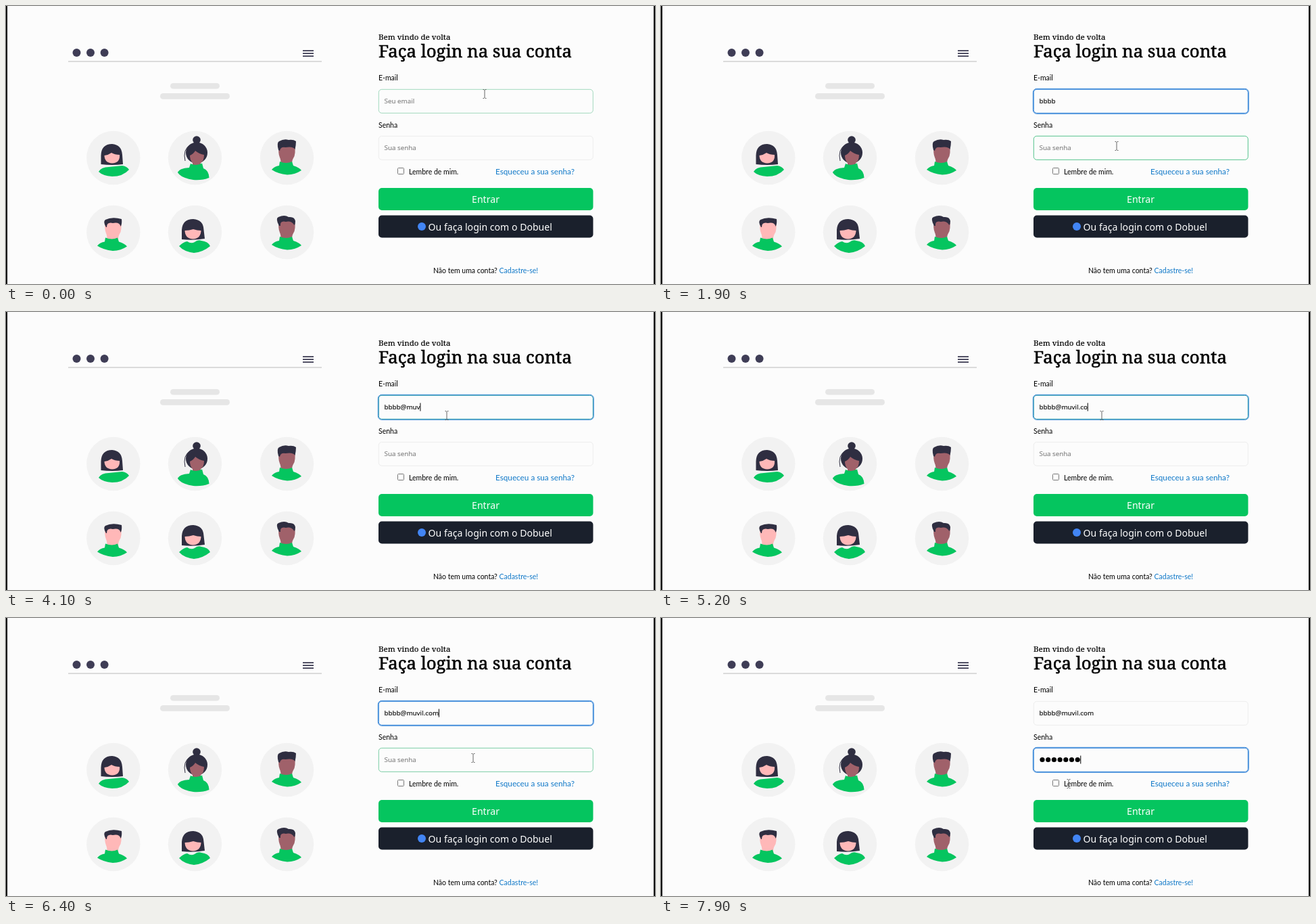
An HTML page that plays this animation: 960 by 411 pixels, repeating every 8000 ms.

```html
<!DOCTYPE html>
<html lang="pt">
<head>
<meta charset="utf-8">
<title>Login</title>
<style>
  html, body { margin: 0; width: 100%; height: 100%; overflow: hidden; background: #fcfcfc; }
  svg { display: block; width: 960px; height: 411px; }
  .serif { font-family: "Noto Serif", serif; stroke: #000; stroke-width: .2; }
  .lato { font-family: Lato, sans-serif; font-size: 10.5px; }
  .sans { font-family: "Noto Sans", sans-serif; font-size: 9.8px; stroke-width: .15; }
  .btn { font-family: "Noto Sans", sans-serif; font-size: 14.1px; fill: #fff; }
  .link { fill: #0f78c8; }
  .hair { fill: #2f2e41; }
  .light { fill: #ffb8b8; }
  .dark { fill: #a0616a; }
  .shirt { fill: #05c55f; }
</style>
</head>
<body>
<svg viewBox="0 0 960 411">
  <defs>
    <path id="face" d="M404 207L427 206Q429 219 425 225Q423 228 423 234H406Q407 228 405 224Q402 217 404 207Z"/>
    <path id="sweater" class="shirt" d="M393 242Q397 237 404 236L405 230Q415 234 423 230L425 236Q434 239 437 243Q428 249 416 249.500Q402 248 393 242Z"/>
  </defs>
  <rect width="960" height="411" fill="#fcfcfc"/>
  <path d="M0 0H2V411H0ZM958 0H960V411H958Z" fill="#0a0a0a"/>

  <g fill="#3f3d56">
    <circle cx="104.5" cy="69" r="6"/>
    <circle cx="125" cy="69" r="6"/>
    <circle cx="145.6" cy="69" r="6"/>
  </g>
  <path d="M439 66.200H455M439 70.200H455M439 74.200H455" stroke="#3a3950" stroke-width="1.800"/>
  <path d="M92 82H467" stroke="#d0d0d0" stroke-width="1.3"/>
  <g fill="#e6e6e6">
    <rect x="243" y="114" width="73" height="8.6" rx="4.3"/>
    <rect x="228" y="129" width="103" height="8.8" rx="4.4"/>
  </g>
  <g id="discs" fill="#f2f2f2"></g>

  <g>
    <path class="hair" d="M140.500 234V221Q141 204 157 204Q171 205 172 220L173 234Q157 236 140.500 234Z"/>
    <path class="light" d="M145.500 221Q152 220 156 217Q161 220 168 220Q169 232 157 232.500Q146 232 145.500 221Z"/>
    <path class="shirt" d="M137 245Q141 238 152 238L172 236Q179 237 182 242Q173 252 157 252Q143 251 137 245Z"/>
  </g>
  <g>
    <circle class="hair" cx="282" cy="198" r="5.800"/>
    <ellipse class="hair" cx="282" cy="217" rx="16" ry="15.500"/>
    <path d="M273 205Q261 212 265 229" fill="none" stroke="#2f2e41"/>
    <path class="dark" d="M272 221Q277 219 280 214Q286 219 293 220Q293 229 288 232V239H276V232Q272 228 272 221Z"/>
    <path class="shirt" d="M254 246Q256 240 271 239L273 233Q281 237 290 232.500L292 240Q300 243 300.500 254Q290 258 277 257Q258 254 254 246Z"/>
  </g>
  <g>
    <use href="#face" class="dark"/>
    <path class="hair" d="M403 213Q400 202 404 200Q411 196 418 198Q425 197 429 200Q429 205 427.500 212Q425 207 413 209Q406 208 405 214Z"/>
    <use href="#sweater"/>
  </g>
  <g>
    <use href="#face" class="light" x="-257" y="112"/>
    <path class="hair" d="M148 327Q143 319 147 316Q157 311 171 315Q172 322 169.500 326Q168 319 158 321Q149 319 149 327Z"/>
    <use href="#sweater" x="-258" y="112.500"/>
  </g>
  <g>
    <path class="hair" d="M260 345V331Q261 315 277 315Q292 316 292.500 331L294 344Q277 347 260 345Z"/>
    <path class="light" d="M264.500 332Q271 332 277 330Q283 332 288.500 332Q288 344 276.500 344.500Q265 344 264.500 332Z"/>
    <path class="shirt" d="M256 355Q262 349 268 348Q274 352 279 349Q284 345 289 347Q299 348 302 355Q291 364 278 365Q263 363 256 355Z"/>
  </g>
  <g>
    <use href="#face" class="dark" y="111"/>
    <path class="hair" d="M404 325Q398 314 403 312Q412 308 418 312Q427 311 428 318Q428 322 426.500 324Q422 317 414 319Q405 317 406 325Z"/>
    <use href="#sweater" y="111"/>
  </g>

  <g class="serif">
    <text x="551" y="50" font-size="11.6">Bem vindo de volta</text>
    <text x="551" y="76" font-size="25.8" stroke-width=".55" style="stroke-width:.55">Faça login na sua conta</text>
  </g>
  <g class="lato">
    <text x="551" y="110">E-mail</text>
    <text x="551" y="179.500">Senha</text>
    <text x="596" y="248.500">Lembre de mim.</text>
    <text x="724" y="248.500" class="link" style="font-size:11.75px">Esqueceu a sua senha?</text>
    <text x="632" y="394.500">Não tem uma conta? <tspan class="link">Cadastre-se!</tspan></text>
  </g>
  <rect x="579.500" y="239.500" width="9" height="9" rx="1" fill="#fff" stroke="#767676"/>

  <g id="fields"></g>
  <path id="caret" stroke="#000" stroke-width="1"/>

  <rect id="enter" x="551" y="269" width="317.500" height="33" rx="5"/>
  <text class="btn" x="709.500" y="291" text-anchor="middle">Entrar</text>
  <rect x="551" y="309.500" width="317.500" height="33" rx="5" fill="#1a202c"/>
  <circle cx="615" cy="326" r="6" fill="#4285f4"/>
  <text class="btn" x="624.500" y="331.500">Ou faça login com o Dobuel</text>

  <path id="beam" d="M-2.500 -6.500H-1L0 -5.500L1 -6.500H2.500M0 -5.500V5.500M-2.500 6.500H-1L0 5.500L1 6.500H2.500" fill="none" stroke="#555" stroke-width=".9"/>
  <path id="hand" d="M-5 -5Q-4 -8 -2 -5L-.5 -1.500L5 -.5Q7 0 6.500 3L5.500 7H-1.500L-6 2Q-6 0 -3 1Z" fill="#111" stroke="#fff" stroke-width=".6"/>
</svg>
<script>
  const $ = id => document.getElementById(id);
  const LOOP = 8000, STEP = 100, FADE = 200;
  const address = 'bbbb@muvil.com';

  // [time, characters shown]
  const emailKeys = [[600, 1], [800, 2], [1000, 3], [1300, 4], [2800, 5], [3500, 6], [3700, 7],
    [3900, 8], [4800, 9], [5000, 11], [5100, 12], [5200, 13], [5400, 14]];
  const passKeys = [[6800, 1], [6900, 2], [7100, 3], [7300, 4], [7400, 5], [7600, 6], [7800, 7]];
  // [time, x, y]
  const pointer = [[0, 708, 130], [300, 700, 142], [1200, 700, 142], [1500, 690, 172], [1800, 676, 206],
    [1900, 674, 207], [2000, 673, 204], [2400, 652, 153], [5800, 652, 153], [6200, 680, 190],
    [6400, 691, 207], [6600, 689, 212], [6900, 640, 274], [7100, 623, 283], [7300, 620, 280],
    [7600, 605, 247], [7700, 603, 245], [8000, 603, 245]];

  const clamp = v => Math.max(0, Math.min(1, v));
  const count = (keys, t) => keys.reduce((n, k) => t >= k[0] ? k[1] : n, 0);
  const level = (t, spans) => spans.reduce((v, [a, b]) =>
    Math.max(v, clamp((t - a) / FADE) - clamp((t - b) / FADE)), 0);
  const mix = (a, b, k) => a.map((v, i) => v + (b[i] - v) * k);
  const rgb = c => `rgb(${c.map(Math.round)})`;

  const IDLE = [237, 237, 237], GREEN = [84, 196, 140], BLUE = [49, 130, 215], TEAL = [38, 150, 170];

  for (const y of [224.5, 334.5]) for (const x of [158.8, 279.5, 415.5])
    $('discs').innerHTML += `<circle cx="${x}" cy="${y}" r="39.700"/>`;

  const fields = [
    { y: 123, hint: 'Seu email', hover: [[-100, 1400], [2200, 6000]], focus: [[100, 6500]] },
    { y: 192, hint: 'Sua senha', hover: [[1650, 2150], [6250, 6750]], focus: [[6500, 9000]] }
  ];
  for (const f of fields) {
    $('fields').insertAdjacentHTML('beforeend', `<g>
      <rect x="550.300" y="${f.y - .7}" width="319" height="37" rx="5.500" fill="none" stroke="${rgb(BLUE)}"/>
      <rect x="551.300" y="${f.y + .3}" width="317" height="35" rx="4.500" fill="#fcfcfc"/>
      <text class="sans" x="559.500" y="${f.y + 20.5}"></text><g></g></g>`);
    [f.ring, f.box, f.text, f.dots] = $('fields').lastElementChild.children;
  }

  function drawField(f, t) {
    const h = level(t, f.hover), k = level(t, f.focus);
    f.ring.setAttribute('opacity', k);
    f.box.setAttribute('stroke', rgb(mix(mix(IDLE, GREEN, h), mix(BLUE, TEAL, h), k)));
  }

  function setText(f, value) {
    const color = value ? '#111' : '#858585';
    f.text.textContent = value || f.hint;
    f.text.setAttribute('fill', color);
    f.text.setAttribute('stroke', color);
  }

  function pointerAt(t) {
    const i = pointer.findIndex(p => p[0] > t);
    const [a, b] = [pointer[i - 1], pointer[i]];
    return mix(a, b, (t - a[0]) / (b[0] - a[0])).slice(1);
  }

  function draw(t) {
    const [email, pass] = fields;
    fields.forEach(f => drawField(f, t));

    const typed = address.slice(0, count(emailKeys, t));
    setText(email, typed);

    const n = count(passKeys, t);
    setText(pass, '');
    pass.text.setAttribute('opacity', n ? 0 : 1);
    pass.dots.innerHTML = Array.from({ length: n }, (_, i) =>
      `<circle cx="${564 + i * 8.7}" cy="209.500" r="3.600"/>`).join('');

    const inPass = t >= 6500;
    const x = inPass ? 559.5 + n * 8.75 : 559.8 + (typed ? email.text.getComputedTextLength() : 0);
    const y = inPass ? 203.5 : 134.5;
    $('caret').setAttribute('d', `M${x} ${y}v12`);
    $('caret').setAttribute('opacity', t < 100 || (t >= 1400 && t < 2000) ? 0 : 1);

    $('enter').setAttribute('fill', rgb(mix([5, 197, 95], [52, 198, 120], level(t, [[6850, 7350]]))));

    const [px, py] = pointerAt(t);
    const overButton = py >= 269;
    for (const id of ['beam', 'hand']) {
      $(id).setAttribute('transform', `translate(${px} ${py})`);
      $(id).setAttribute('opacity', (id === 'hand') === overButton ? 1 : 0);
    }
  }

  const start = performance.now();
  let last = -1;
  function tick() {
    const t = Math.floor((performance.now() - start) % LOOP / STEP) * STEP;
    if (t !== last) draw(last = t);
    requestAnimationFrame(tick);
  }
  tick();
</script>
</body>
</html>
```
